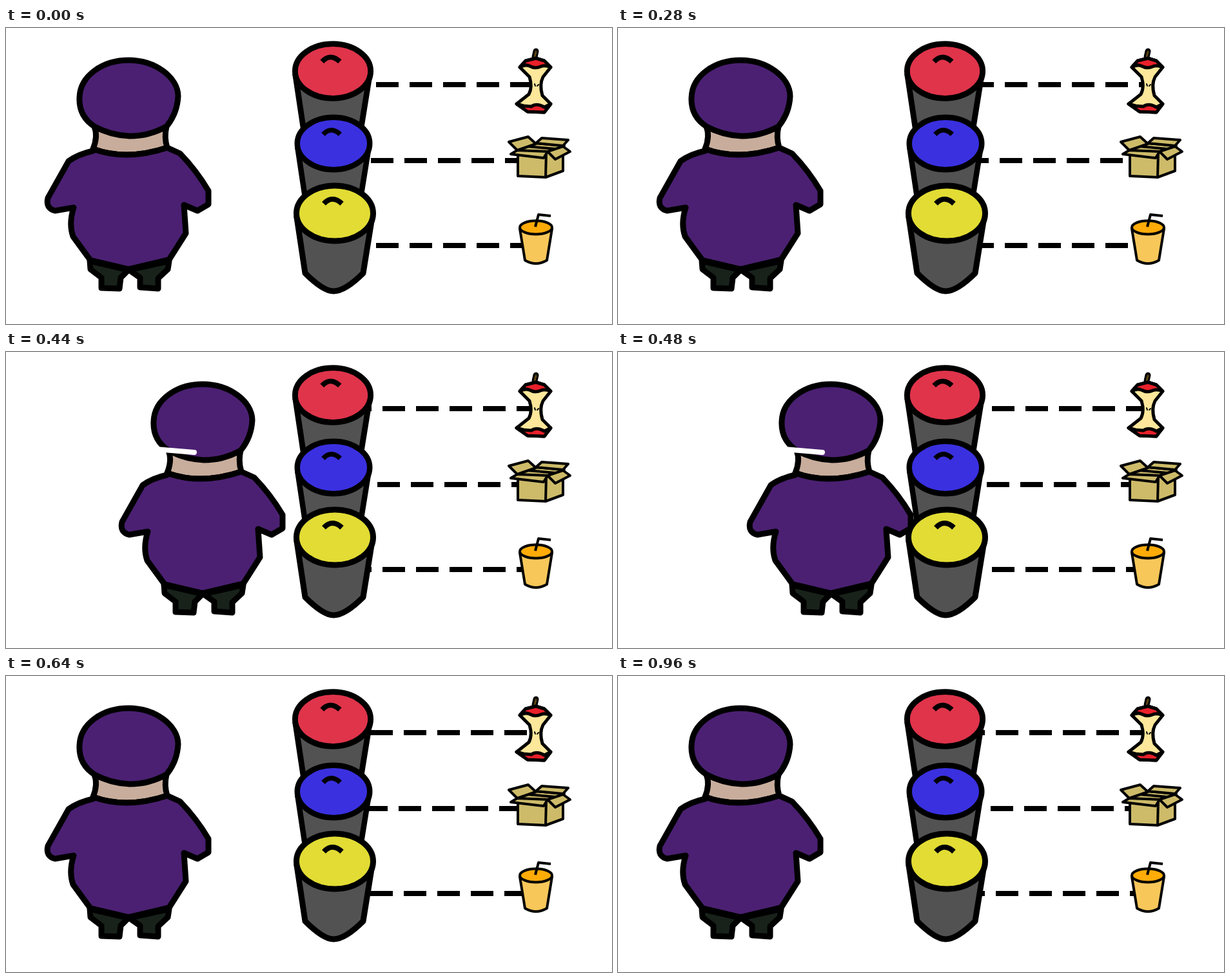
Recreate the animation shown at these times as an HTML page. Size 940 px wide and 460 px high, loop 1000 ms.

```html
<!DOCTYPE html>
<html lang="en">
<head>
<meta charset="utf-8">
<title>Sorting bins</title>
<style>
  html, body { margin: 0; width: 100%; height: 100%; overflow: hidden; background: #fff; }
  svg { display: block; width: 100vw; height: 100vh; }
  .ink { stroke: #000; stroke-linejoin: round; stroke-linecap: round; fill: none; }
  .purple { fill: #4b2072; }
  .card { fill: #cdbb69; }
</style>
</head>
<body>
<svg viewBox="0 0 940 460">
  <g id="dashes" stroke="#000" stroke-width="8" stroke-dasharray="35 17">
    <path d="M520 88H824"/>
    <path d="M512 206H816"/>
    <path d="M520 338H824"/>
  </g>

  <g id="person" class="ink" stroke-width="9">
    <g style="fill:#18221a">
      <path d="M130 362L131 375L148 388V404L176 405L178 388L190 376Z"/>
      <path d="M253 362L251 375L236 389V405L208 403V388L191 376Z"/>
    </g>
    <path style="fill:#c8ad9c" d="M137 153Q143 168 135 188Q187 207 250 186Q245 170 249 153Q192 180 137 153Z"/>
    <path class="purple" d="M135 188Q187 207 250 186L270 195Q296 222 314 253V274L297 284L276 275L279 319L253 360L190 375L131 361L104 324Q97 304 105 279L76 284Q61 280 65 264L97 207Q112 196 135 191Z"/>
    <path class="purple" d="M137 153C122 143 113 128 114 108C115 74 150 50 190 50C232 50 267 77 267 106C266 126 258 142 249 153Q222 168 192 168Q163 167 137 153Z"/>
    <path id="streak" style="stroke:#fff;stroke-width:8"/>
  </g>

  <g id="cans"></g>

  <g class="ink" stroke-width="5">
    <path d="M820 45L822 36" stroke-width="9"/>
    <path d="M820 45L822 37" stroke="#5f4612" stroke-width="3"/>
    <path style="fill:#fde79a" d="M797 61L812 76Q817 92 811 103L792 118L809 130L835 131L845 118L832 105Q827 88 833 76L845 61L835 51L822 47L806 51Z"/>
    <g style="fill:#e8202a">
      <path d="M797 61L806 51L822 47L835 51L845 61Q836 57 829 60Q821 64 812 59Q805 56 797 61Z"/>
      <path d="M792 118L809 130L835 131L845 118L835 123Q823 116 815 122L803 121Z"/>
    </g>
    <path d="M820 87L821 90M826 88L824 90" stroke-width="2"/>
  </g>

  <g class="ink" stroke-width="4">
    <path class="card" d="M794 192V230L837 232L864 222V184L822 179Z"/>
    <path class="card" d="M793 190L822 179L866 183L840 193Z"/>
    <path d="M838 193L837 232M808 184L853 188"/>
    <path class="card" d="M822 179L831 171L872 174L864 183Z"/>
    <path class="card" d="M780 177L810 169L822 180L793 190Z"/>
    <path class="card" d="M793 190L840 192L834 202L783 196Z"/>
    <path class="card" d="M840 192L864 184L875 192L852 204Z"/>
  </g>

  <g class="ink" stroke-width="4">
    <path style="fill:#f8c75a" d="M797 312L805 361Q822 371 839 361L847 312Z"/>
    <ellipse style="fill:#ffab08" cx="822" cy="310" rx="25" ry="10.5"/>
    <path d="M821 309L826 290L845 292" style="stroke-linecap:butt"/>
  </g>
</svg>
<script>
  const el = id => document.getElementById(id);
  const LOOP = 1000, STEP = 40;

  const can = (x, y, size, lid) => `
    <g class="ink" stroke-width="9" transform="translate(${x} ${y}) scale(${size})">
      <path style="fill:#525252" d="M-59 6L-46 93Q-18 121 -2 121Q16 121 44 93L58 6Z"/>
      <ellipse style="fill:${lid}" rx="59.5" ry="43"/>
      <path d="M-17 -15Q-4 -29 11 -15" style="stroke-linecap:butt;stroke-width:8"/>
    </g>`;
  el('cans').innerHTML =
    can(507, 67, 0.985, '#e0344b') +
    can(508, 179.5, 0.945, '#3a30e0') +
    can(510, 288, 1, '#e2dc34');

  // [time, sideways shift]
  const lunge = [[320, 0], [360, 15], [400, 60], [440, 115], [480, 140], [520, 95], [560, 38], [600, 8], [640, 0]];
  // [from, to, path on the figure]
  const streaks = [
    [360, 420, 'M95 242L138 246'],
    [420, 500, 'M118 151L177 156']
  ];

  function shiftAt(t) {
    const i = lunge.findIndex(p => p[0] >= t);
    if (i < 1) return 0;
    const [t0, a] = lunge[i - 1], [t1, b] = lunge[i];
    return a + (b - a) * (t - t0) / (t1 - t0);
  }

  function draw() {
    const t = Math.floor(performance.now() % LOOP / STEP) * STEP;
    const dashStart = Math.round(574.4 - 0.0958 * t);
    el('dashes').setAttribute('stroke-dashoffset', (520 - dashStart + 156) % 52);
    el('person').setAttribute('transform', `translate(${shiftAt(t)} 0)`);
    const s = streaks.find(([from, to]) => t >= from && t < to);
    el('streak').setAttribute('d', s ? s[2] : '');
    requestAnimationFrame(draw);
  }
  draw();
</script>
</body>
</html>
```
